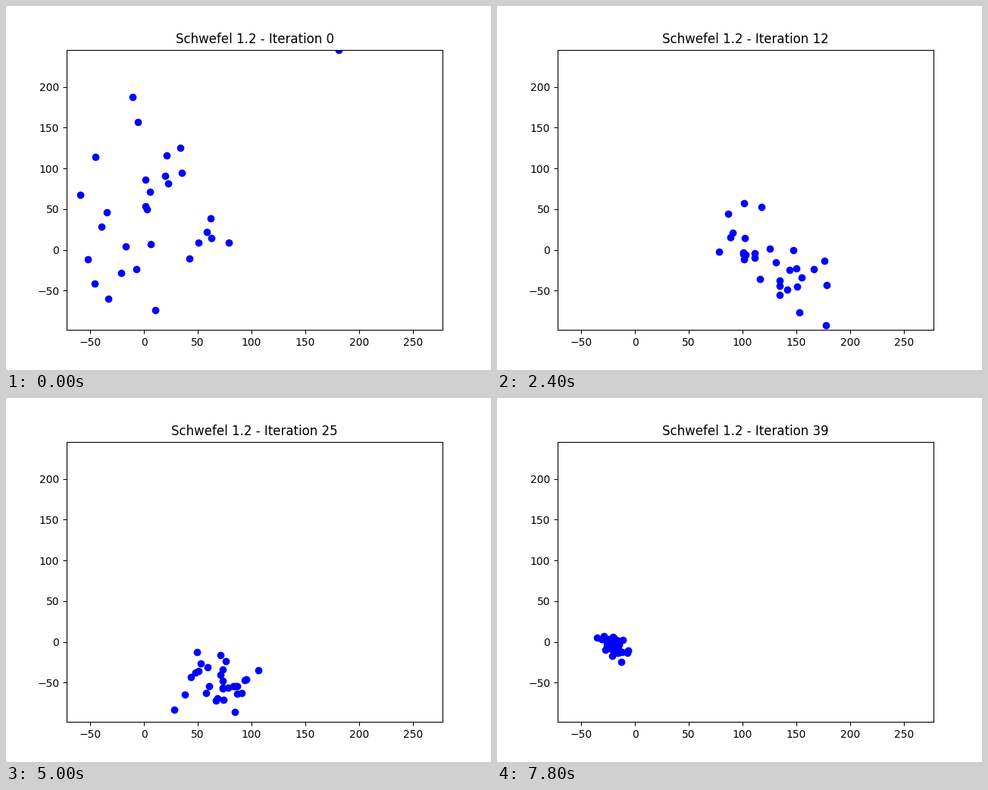
A matplotlib script for the animation above (8000 ms loop, 640x480 px).

```python
import numpy as np
import matplotlib.pyplot as plt
from matplotlib.animation import FuncAnimation

STEPS, INTERVAL, SIZE = 40, 200, 30
LEADER = 181, 245.7  # lone best point the swarm first heads for

# Key points of the swarm centre
KEY_STEPS = [0, 2, 4, 7, 12, 16, 25, 31, 39]
KEY_X = [3, 95, 180, 167, 127, 93, 70, 32, -20]
KEY_Y = [43, 70, 68, 33, -15, -23, -50, -36, -4]


def swarm(step):
    """Points of one generation, drawn afresh around the moving centre."""
    cx = np.interp(step, KEY_STEPS, KEY_X)
    cy = np.interp(step, KEY_STEPS, KEY_Y)
    sx = 38 - 0.8 * step
    sy = 1.1 * sx + 20 * np.exp(-step)
    tilt = -0.012 * step

    z = np.random.default_rng(100 + step).standard_normal((SIZE, 2))
    u, v = ((z - z.mean(0)) / z.std(0)).T
    x = cx + sx * u
    y = cy + sy * (tilt * u + np.sqrt(1 - tilt ** 2) * v)
    if step == 0:
        x[0], y[0] = LEADER
    return x, y


fig, ax = plt.subplots(figsize=(6.4, 4.8), dpi=100)
ax.set_xlim(-71.97, 277.63)
ax.set_ylim(-98.34, 245.76)
dots, = ax.plot([], [], "bo")
title = ax.set_title("")


def draw(step):
    dots.set_data(*swarm(step))
    title.set_text(f"Schwefel 1.2 - Iteration {step}")
    return dots, title


anim = FuncAnimation(fig, draw, frames=STEPS, interval=INTERVAL,
                     repeat=True, repeat_delay=0, blit=False)
plt.show()
```
